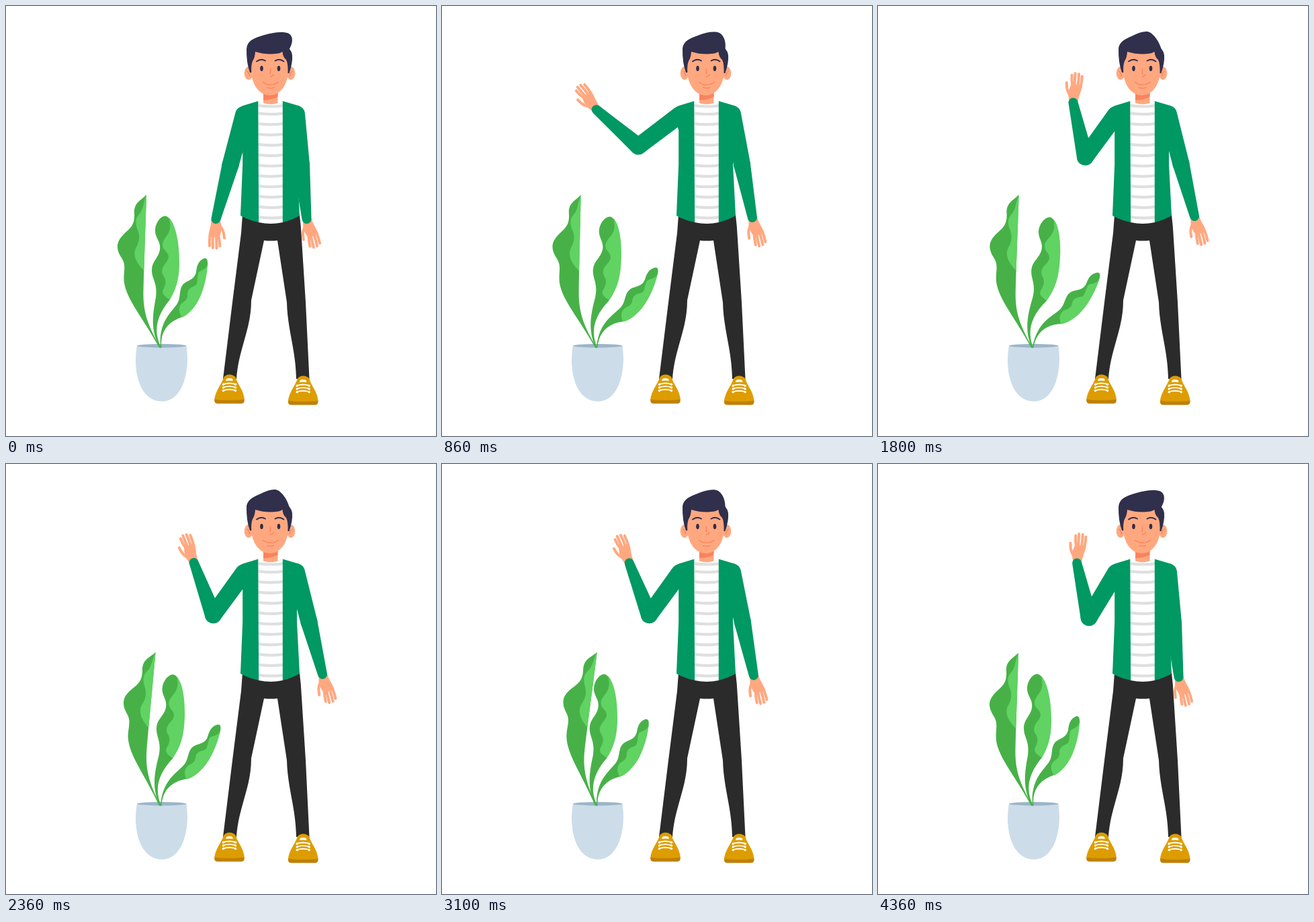
Write an HTML page that moves like this. It is 640 by 640 pixels and loops after 4560 ms.

```html
<!DOCTYPE html>
<html lang="en">
<head>
<meta charset="utf-8">
<title>Waving man</title>
<style>
  html, body { margin: 0; width: 100%; height: 100%; overflow: hidden; background: #fff; }
  svg { display: block; width: 100%; height: 100%; }
  .green { fill: #009863; }
  .skin { fill: #ffa880; }
  .dark { fill: #47b148; }
  .light { fill: #60d362; }
  .pants { fill: #2b2b2b; }
  .hair { fill: #302f4c; }
  .line { fill: none; stroke-linecap: round; stroke-linejoin: round; }
  .finger { stroke: #ffa880; stroke-width: 4; }
  .brow { stroke: #302f4c; stroke-width: 1.9; }
  .crease { stroke: #f9835d; stroke-width: 1.3; }
  .stripe { fill: none; stroke: #dfdfdf; stroke-width: 4.2; }
  .lace { stroke: #fff; stroke-width: 1.9; }
</style>
</head>
<body>
<svg viewBox="0 0 640 640">
  <defs>
    <g id="hand">
      <path class="skin" d="M-7 1C-7 12-11 17-11 27L5.500 27C6 23 9 20 8 9L6 1Z"/>
      <path class="line finger" d="M-8.800 24Q-10 33-9.500 40M-4.400 25Q-5.200 34-4.500 43M.3 25Q1 34 1 43.500M3.200 23Q5.800 32 5.800 40.500"/>
      <path class="line finger" d="M4 8Q10 15 11.500 21L12.500 28.500"/>
    </g>
    <g id="lace">
      <path class="line lace" d="M323.500 563Q332.500 560 341.500 563"/>
      <circle cx="323.500" cy="563.300" r="1.700" fill="#fff"/>
      <circle cx="341.500" cy="563.300" r="1.700" fill="#fff"/>
    </g>
    <g id="shoe">
      <path fill="#dd9d00" d="M310 587C311 573 321 563 324 553C327 547 338 547 342 553C344 563 354 571 355 587Z"/>
      <path fill="#c08008" d="M310.300 585.500Q332 588 354.800 585.500L354.500 589Q354 591.500 350 591.800H315Q310.500 591.500 310.300 588Z"/>
      <path fill="#fff" d="M327.500 558V556Q328 554 332.500 554T337.500 556V558Q332.500 557 327.500 558Z"/>
      <use href="#lace"/><use href="#lace" y="4.600"/><use href="#lace" y="9.200"/>
    </g>
    <clipPath id="shirt"><path d="M375.500 140H412V322Q394 326 376 322Z"/></clipPath>
  </defs>

  <!-- plant -->
  <path fill="#ccdde9" d="M195 505.500H268.500Q270 516 270 527C269 562 256 588.500 231.500 588.500S193 562 193 527Q193 516 195 505.500Z"/>
  <ellipse cx="231.700" cy="505.700" rx="36.800" ry="2.700" fill="#9bb5c9"/>
  <g id="leaf1">
    <path class="dark" d="M209 281C200 290 190 293 191 309C192 327 184 331 175 340C163 352 164 362 172 375C180 387 174 396 176 412C180 438 204 464 228 508.500H230C215 482 205 462 204.500 432C205 395 208 320 209 281Z"/>
    <path class="light" d="M209 281L205.300 394C196 384 188 373 193 361C197 353 200 347 197 336C192 324 192 317 198 310C205 303 204 292 209 281Z"/>
  </g>
  <g id="leaf2">
    <path class="dark" d="M236 312.500C228 314 222 325 222 334C222 346 231 350 229 363C227 375 217 380 217 393C217 407 226 412 223 434C218 460 215 484 229 508.500H231C221 488 220 466 244 437L248 326Q243 312 236 312.500Z"/>
    <path class="light" d="M242.500 315C252 324 258 350 258 382C258 405 254 420 244 437C236 432 231 428 234 422C238 414 239 408 234 401C230 394 233 388 239 381C244 373 242 369 236 363C230 356 234 349 240 341C246 332 245 325 242.500 315Z"/>
  </g>
  <g id="leaf3">
    <path class="dark" d="M295 375.500C286 379 284 387 283 396C280 409 270 407 263 415C256 424 262 436 252 447C243 459 227 473 230 508.500H231.500C229 486 240 470 262 463L300 386Q301 374 295 375.500Z"/>
    <path class="light" d="M300.300 382C300 398 295 422 287 437C280 450 271 460 262 463.500C257 456 256 449 261 443C268 438 271 435 270 428C271 420 276 419 282 416C286 412 284 406 286 398C289 392 299 394 300.300 382Z"/>
  </g>

  <!-- legs -->
  <path class="pants" d="M352 311H437L438.800 328L446 441L451.500 555H432C431 510 419 482 418 441L404 349Q394 350 384 349L365 438C365 482 346 510 343 555H323L337 441L350 338Z"/>
  <use href="#shoe"/>
  <use href="#shoe" x="109.700" y="2"/>

  <!-- torso -->
  <path fill="#fff" d="M375 140H412V322Q394 326 376 322Z"/>
  <g id="stripes" clip-path="url(#shirt)"></g>
  <path class="green" d="M375.300 141.500L353 148.300Q345 151 345 160L352.200 185V235L349 312Q361 319 376.200 322Z"/>
  <path class="green" d="M411.800 141.500L434 148Q443 151 444 160L433 185V235L437 312Q426 318.500 411.800 322Z"/>

  <!-- head -->
  <path class="skin" d="M383 122H404.500V144.500Q394 148 383 144.500Z"/>
  <path fill="#f9835d" d="M383 128H404.500V135Q397 140 383 140Z"/>
  <g class="skin">
    <ellipse cx="361" cy="100" rx="6.300" ry="10"/>
    <ellipse cx="424" cy="100" rx="6.300" ry="10"/>
    <path d="M365 68H420V98C419 117 408 133 392.500 133S366 117 365 98Z"/>
  </g>
  <path class="line crease" d="M358.500 97Q362 99 362.500 104M426.500 97Q423 99 422.500 104"/>
  <path class="hair" d="M358 63Q357.500 84 363 99H365.300Q364.500 88 367 82Q370.500 77 371 68Q384 72 396 71.500Q408 71 411.500 68Q412 76 417 80Q420 86 419.500 100H421.500Q427 84 426 73Q425 67 421 63Z"/>
  <path class="hair" id="quiff"/>
  <path class="line brow" d="M373 82.500Q379.500 77.500 386 81.500M400.500 81.500Q407 77.500 413.500 82.500"/>
  <ellipse class="hair" cx="380.500" cy="93" rx="2.300" ry="4.100"/>
  <ellipse class="hair" cx="406" cy="93" rx="2.300" ry="4.100"/>
  <path class="line crease" d="M393.300 93.500V101M393 105.300Q396.500 104.500 398.500 102M382.500 113.500Q393 121 405.500 113.500M388.500 121.300Q393.500 123.300 399 121.300"/>

  <!-- arms -->
  <g id="rightArm">
    <g id="rightHand"><use href="#hand" transform="scale(-1 1)"/></g>
    <path class="green" data-limb="13 12.5 76.5"/>
    <path class="green" data-limb="12.5 7 80.3" transform="translate(0 76.500)"/>
  </g>
  <g id="upper">
    <path class="green" data-limb="13 12.5 77.5"/>
    <g id="fore">
      <g id="wrist"><use href="#hand"/></g>
      <path class="green" data-limb="12.5 7 83"/>
    </g>
  </g>
</svg>
<script>
  const LOOP = 4560, BEAT = 560, LAST = 4360;
  const MARKS = [440, 300, 260, 120, 0];
  const el = id => document.getElementById(id);

  // Eases from 0 to 1 between two times.
  function ease(t, from, to) {
    const u = Math.min(1, Math.max(0, (t - from) / (to - from)));
    return u * u * (3 - 2 * u);
  }

  // Two waves of the hand: 0 upright, 1 leaning outward.
  function lean(t) {
    const turns = Math.min(2, Math.max(0, (t - 1800) / 910));
    return (1 - Math.cos(turns * 2 * Math.PI)) / 2;
  }

  // Tapered sleeve with round ends.
  for (const limb of document.querySelectorAll('[data-limb]')) {
    const [a, b, len] = limb.dataset.limb.split(' ').map(Number);
    limb.setAttribute('d', `M${a} 0L${b} ${len}A${b} ${b} 0 0 1 ${-b} ${len}L${-a} 0A${a} ${a} 0 0 1 ${a} 0Z`);
  }

  const stripe = y => `<path class="stripe" d="M374 ${y}Q394 ${y + 3} 414 ${y}"/>`;
  let stripes = stripe(148);
  for (let y = 159.5; y < 320; y += 15.45) stripes += stripe(y);
  el('stripes').innerHTML = stripes;

  const turn = (id, x, y, angle) => el(id).setAttribute('transform', `translate(${x} ${y}) rotate(${angle})`);
  const sway = (id, angle) => el(id).setAttribute('transform', `rotate(${angle} 229 508)`);

  // The picture is held between fixed marks of each beat.
  function hold(t) {
    const start = Math.floor(t / BEAT) * BEAT;
    return Math.min(LAST, start + MARKS.find(m => m <= t - start));
  }

  function poseArms(t) {
    const rise = ease(t, 0, 1260);
    const upper = 15 + 69 * ease(t, 0, 680) - 48 * ease(t, 680, 980) - 5 * ease(t, 3100, 3620);
    const fore = 15 + 152.5 * rise - 9 * lean(t);
    const wrist = -15 + 33 * rise - 21 * lean(t);
    turn('upper', 354, 162, upper);
    turn('fore', 0, 77.5, fore - upper);
    turn('wrist', 0, 83, wrist);

    const right = 5.7 + 8.7 * (ease(t, 0, 1500) - ease(t, 2400, 4300));
    turn('rightArm', 432, 161, -right);
    turn('rightHand', 0, 156.8, right - 15);
  }

  function poseLeaves(t) {
    const low = 15 * ease(t, 0, 1380) - 11.4 * ease(t, 1700, 3000) - 3.6 * ease(t, 3000, LAST);
    sway('leaf1', 6.4 * ease(t, 1400, 2950) - 0.9 * ease(t, 0, 1400) - 5.5 * ease(t, 3050, 4300));
    sway('leaf2', low * 0.38);
    sway('leaf3', low);
  }

  // The front of the quiff sinks as k goes to 1.
  function poseHair(t) {
    const k = ease(t, 0, 1750) - ease(t, 2200, 4400);
    el('quiff').setAttribute('d', `M358 64C359 52 ${368 + 3 * k} 48 ${384 - 3 * k} 43.3
      C${398 - 8 * k} 39 ${413 - 13 * k} ${37.5 - 2 * k} ${421 - 15 * k} ${41 - k}
      C${429 - 15 * k} 46 ${426 - 7 * k} ${58 - 3 * k} ${421 + k} 65Z`);
  }

  const begin = performance.now();
  function frame() {
    const t = hold((performance.now() - begin) % LOOP);
    poseArms(t);
    poseLeaves(t);
    poseHair(t);
    requestAnimationFrame(frame);
  }
  frame();
</script>
</body>
</html>
```
